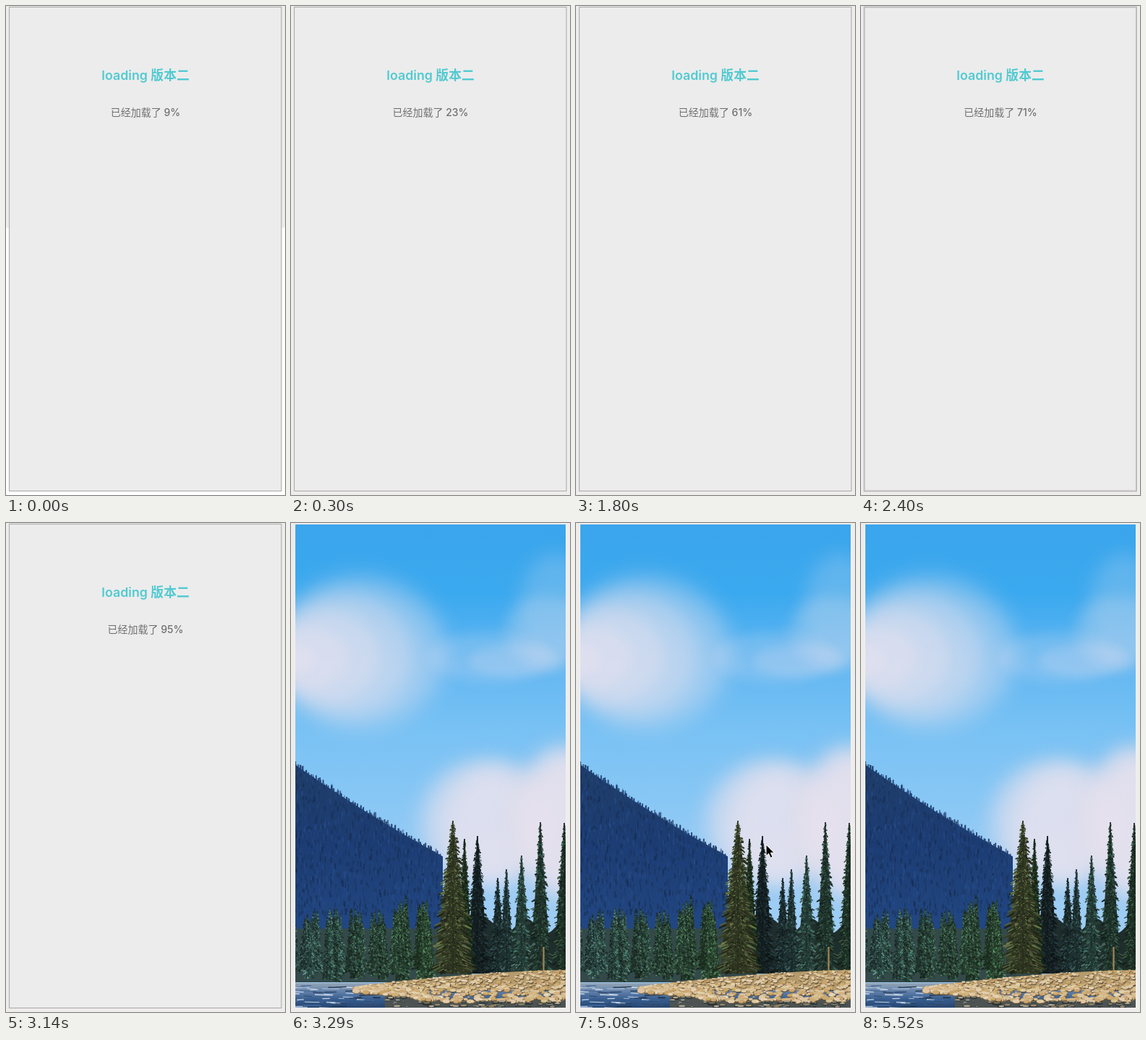
Write an HTML page with a canvas that moves like this. It is 386 px wide and 675 px high and loops after 6.28 s.

```html
<!DOCTYPE html>
<html lang="zh">
<head>
<meta charset="utf-8">
<title>loading</title>
<style>
  html, body { margin: 0; width: 100%; height: 100%; overflow: hidden; background: #efedec; }
  svg, canvas { position: absolute; left: 0; top: 0; display: block; }
  text { font-family: Inter, "Noto Sans CJK SC", "Noto Sans CJK", sans-serif; text-anchor: middle; }
  .title { font-size: 17.8px; font-weight: 600; fill: #52cad1; }
  .status { font-size: 14px; font-weight: 500; fill: #707070; }
</style>
</head>
<body>
<svg width="386" height="675">
  <path id="blank" d="M0 306H386V675H0Z" fill="#fff"/>
  <rect id="panel" x="4.5" y="1.5" width="376.5" height="668" fill="#ececec"/>
  <text class="title" x="193" y="102">loading 版本二</text>
  <text class="status" id="status" x="193" y="152.3"></text>
</svg>
<canvas id="photo" width="386" height="675"></canvas>
<svg width="386" height="675">
  <path id="cursor" d="M0 0V15.6L3.5 12.3 6.1 18.2 9 17 6.4 11.2H11.2Z" fill="#000" stroke="#fff" stroke-linejoin="round"/>
</svg>
<script>
const $ = id => document.getElementById(id);
const ctx = $('photo').getContext('2d');
const LEFT = 6, TOP = 2, RIGHT = 380, BOTTOM = 669;

let seed = 7;
const rand = (min = 0, max = 1) => {
  seed = (seed * 16807) % 2147483647;
  return min + (max - min) * seed / 2147483647;
};
const mix = (a, b, k) => a + (b - a) * k;
const hsl = (h, s, l, a = 1) => `hsl(${h} ${s}% ${l}% / ${a})`;

function gradient(y0, y1, ...colors) {
  const g = ctx.createLinearGradient(0, y0, 0, y1);
  colors.forEach((c, i) => g.addColorStop(i / (colors.length - 1), c));
  return g;
}

// Fills everything between a skyline y = edge(x) and a bottom line.
function hill(x0, x1, edge, bottom, fill) {
  ctx.beginPath();
  for (let x = x0; x <= x1; x++) ctx.lineTo(x, edge(x));
  ctx.lineTo(x1, bottom);
  ctx.lineTo(x0, bottom);
  ctx.fillStyle = fill;
  ctx.fill();
}

function blob(x, y, rx, ry, fill) {
  ctx.beginPath();
  ctx.ellipse(x, y, rx, ry, 0, 0, 7);
  ctx.fillStyle = fill;
  ctx.fill();
}

function line(x0, y0, x1, y1, color, width) {
  ctx.beginPath();
  ctx.moveTo(x0, y0);
  ctx.lineTo(x1, y1);
  ctx.strokeStyle = color;
  ctx.lineWidth = width;
  ctx.stroke();
}

// Translucent layers that shrink from an outer ellipse to a bright core.
function cloud(outer, core, layers, alpha) {
  for (let i = 0; i < layers; i++) {
    const k = layers > 1 ? i / (layers - 1) : 0;
    const [x, y, rx, ry] = outer.map((v, j) => mix(v, core[j], k));
    ctx.filter = `blur(${4 + ry / 9}px)`;
    blob(x, y, rx, ry, `rgb(231 226 238 / ${alpha})`);
  }
  ctx.filter = 'none';
}

function drawSky() {
  ctx.fillStyle = gradient(TOP, 480, '#3aa5ec', '#3ba9ef', '#62b7f2', '#79c2f4', '#88c7f5', '#9dcdf4');
  ctx.fillRect(LEFT, TOP, RIGHT - LEFT, BOTTOM - TOP);
  for (let x = 183; x < RIGHT; x += 90) cloud([x, 11, 20, 9], [], 1, 0.16);
  cloud([95, 178, 118, 104], [4, 188, 30, 20], 5, 0.42);
  cloud([365, 120, 50, 78], [355, 150, 60, 50], 2, 0.22);
  cloud([275, 185, 85, 34], [310, 190, 65, 22], 2, 0.2);
  cloud([155, 385, 75, 30], [], 1, 0.22);
  cloud([272, 410, 96, 86], [280, 420, 56, 74], 4, 0.42);
  cloud([378, 410, 70, 102], [380, 415, 50, 88], 4, 0.5);
  cloud([206, 440, 22, 14], [], 1, 0.8);
}

function drawMountain() {
  const ridge = x => 334 + (x - LEFT) * 0.62 + 4 * Math.sin((x - LEFT) / 64);
  hill(LEFT, 210, ridge, 560, gradient(335, 550, '#1f3d68', '#1c3c74', '#214681'));
  for (let y = 328; y < 548; y += 1.5) {
    for (let i = 0; i < 12; i++) {
      const x = rand(LEFT, 208);
      if (y < ridge(x)) continue;
      line(x, y - rand(4, 9), x, y, hsl(217, 55, rand(18, 36), 0.6), rand(1, 2.4));
    }
  }
  for (let x = LEFT; x < 208; x += rand(2, 5)) {
    line(x, ridge(x) + 4, x, ridge(x) - rand(0, 6), '#1f3f70', 1.8);
  }
}

function conifer(x, top, base, half, hue, light) {
  const height = base - top, tier = 6 + half / 4;
  hill(x - half * 0.65, x + half * 0.65, u => top + height * Math.abs(u - x) / half / 0.75, base, hsl(hue, 24, light * 0.7));
  line(x, top, x, base, hsl(hue, 24, light * 0.6), 1.8);
  for (let y = top + 3; y < base; y += 1.5) {
    const step = ((y - top) / tier) % 1;
    const reach = half * ((y - top) / height) ** 0.72 * (0.72 + 0.33 * step);
    for (let i = 0; i < 2 + reach / 4; i++) {
      const dx = rand(-reach, reach);
      const tone = light * (0.4 + 1.25 * rand() ** 1.6);
      line(x + dx * 0.65, y - Math.abs(dx) * 0.12, x + dx, y + rand(0, 2), hsl(hue + rand(-15, 15), rand(14, 30), tone), rand(1, 2));
    }
  }
}

function drawForest() {
  hill(LEFT, 250, () => 560, 634, '#34494a');
  for (let i = 0; i < 60; i++) {
    const x = LEFT + (i * 31) % 188;
    const rise = 26 * Math.exp(-(((x - 170) / 22) ** 2));
    conifer(x, rand(531, 556) - rise, rand(612, 634), rand(6, 11), mix(175, 130, x / 200), rand(22, 35));
  }
  hill(244, RIGHT, x => 556 + 10 * Math.sin(x / 9), 620, '#1f2e2c');
  // [x, top, half width, hue, lightness]
  [[286, 490, 16, 185, 20], [298, 478, 15, 180, 22], [258, 432, 22, 190, 15], [319, 459, 19, 165, 27],
    [345, 413, 20, 155, 23], [378, 414, 20, 145, 22], [240, 436, 17, 120, 20], [224, 411, 35, 80, 25]]
    .forEach(([x, top, half, hue, light]) => conifer(x, top, 622, half, hue, light));
  line(349.5, 585, 349.5, 618, '#a08658', 2.2);
}

function drawShore() {
  hill(LEFT, RIGHT, () => 635, BOTTOM, gradient(635, BOTTOM, '#95a6b6', '#6382ab', '#365c8d', '#264672'));
  for (let y = 637; y < BOTTOM; y += 0.35) {
    const x = rand(-5, 190);
    line(x, y, x + rand(6, 26), y + rand(-1, 1), hsl(214, 38, rand() < 0.4 ? rand(72, 90) : rand(18, 50)), rand(0.7, 1.8));
  }
  const bank = x => 617 + 24 * ((RIGHT - x) / 300) ** 1.6;
  const foot = x => mix(645, 661, Math.min(1, (x - 80) / 130));
  hill(130, RIGHT, x => foot(x) - 4, BOTTOM, '#4d5352');
  hill(85, RIGHT, bank, 645, '#b59a6c');
  for (let k = 0; k < 1; k += 0.0012) {
    const x = rand(88, RIGHT), r = rand(1, 2 + 2.5 * k);
    const y = mix(bank(x), foot(x), k);
    blob(x + 0.6, y + 1, r * 1.4, r * 0.8, hsl(35, 24, rand(24, 46)));
    blob(x, y, r * 1.3, r * 0.7, hsl(rand(33, 42), 48, rand(58, 82)));
  }
  for (let i = 0; i < 60; i++) {
    const x = rand(128, RIGHT), r = rand(2, 7);
    const y = rand(foot(x), BOTTOM);
    blob(x, y, r, r * 0.4, hsl(200, 14, rand(16, 32)));
    blob(x, y - 1, r * 0.7, r * 0.2, hsl(38, 24, rand(40, 72)));
  }
}

function drawPhoto() {
  ctx.fillStyle = '#efeeed';
  ctx.fillRect(4, 1, 378, 670);
  ctx.beginPath();
  ctx.rect(LEFT, TOP, RIGHT - LEFT, BOTTOM - TOP);
  ctx.clip();
  drawSky();
  drawMountain();
  drawForest();
  drawShore();
}

const LOOP = 6280, PHOTO_START = 3290, ITEMS = 21;
// Moments when more items have arrived: [ms, items loaded]
const progress = [[0, 2], [150, 3], [300, 5], [600, 6], [900, 7], [1350, 10], [1650, 12],
  [1800, 13], [2400, 15], [2550, 16], [2700, 17], [2840, 19], [3140, 20]];
// The pointer jumps along these stops at an even beat.
const POINTER_START = 4778, BEAT = 148;
const stops = [[16, 317], [172, 378], [263, 444], [323, 598], [359, 671]];
const show = (id, on) => { $(id).style.visibility = on ? 'visible' : 'hidden'; };

function render() {
  const t = performance.now() % LOOP;
  const [, loaded] = progress.filter(([start]) => start <= t).pop();
  $('status').textContent = `已经加载了 ${Math.floor(loaded * 100 / ITEMS)}%`;
  const soft = t >= 2400 && t < 2550;
  $('panel').setAttribute('stroke-width', soft ? 2 : 1.1);
  $('panel').setAttribute('stroke', soft ? '#bcbcbc' : '#acacac');
  show('blank', t < 300);
  show('photo', t >= PHOTO_START);
  const stop = stops[Math.floor((t - POINTER_START) / BEAT)];
  show('cursor', stop);
  if (stop) $('cursor').setAttribute('transform', `translate(${stop})`);
  requestAnimationFrame(render);
}

drawPhoto();
render();
</script>
</body>
</html>
```
